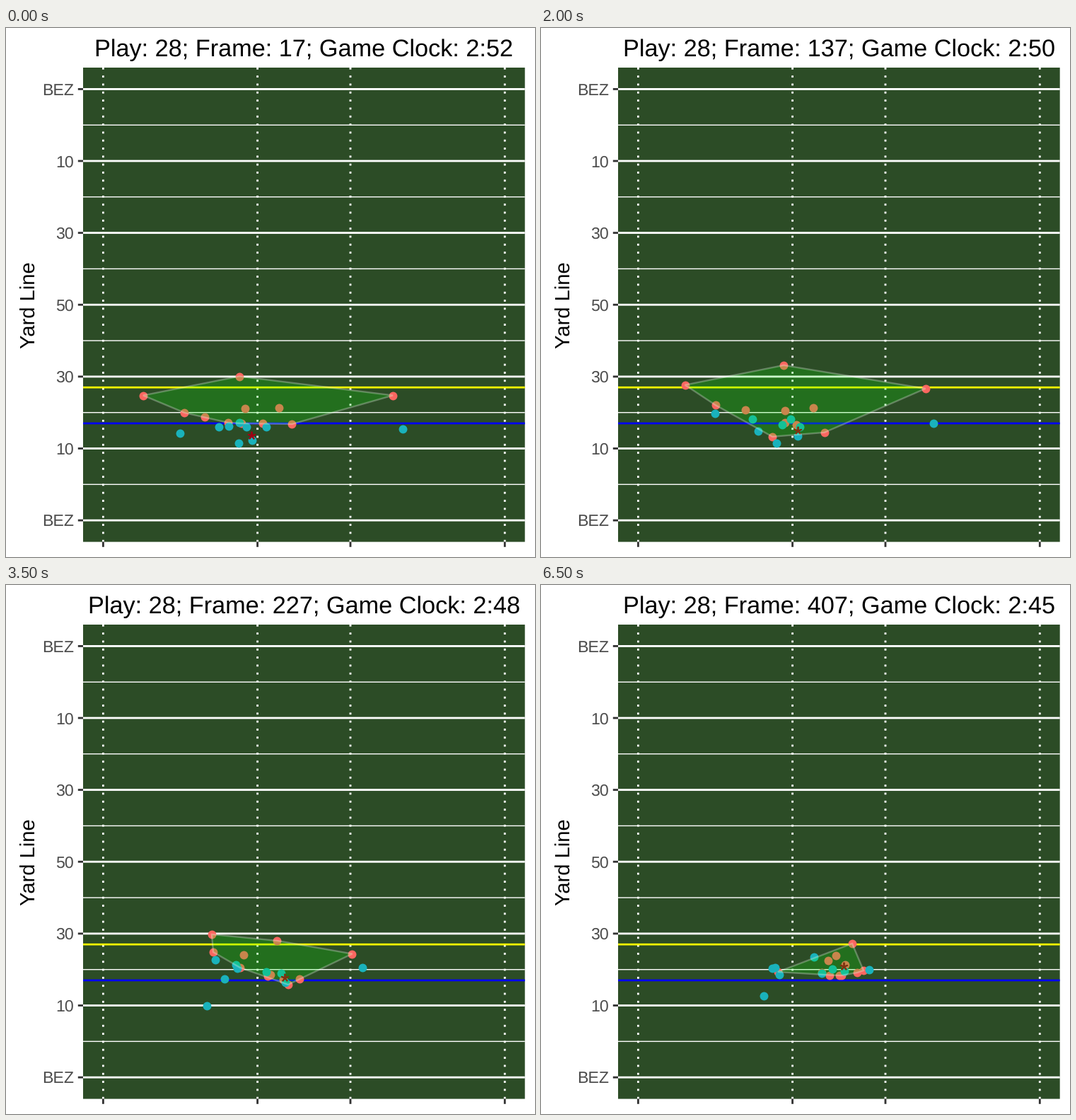
These frames come from a looping animation (748x748 px, 7000 ms). A matplotlib script:

```python
import numpy as np
import matplotlib.pyplot as plt
from matplotlib.animation import FuncAnimation
from matplotlib.patches import Polygon, Rectangle

SIZE, DPI = 748, 64
PX = 72 / DPI                      # points per pixel
STEPS, STEP_MS = 14, 500
LEFT, RIGHT, TOP, BOTTOM = 109, 733.7, 56, 726.6
GAP = 101.63                       # 20 yards
TURF, RED, TEAL = "#2c4c26", "#fa6760", "#1ab2bc"
MAJOR, MINOR = 2.83, 1.41

# line-up, snap, contact, end of play
PHASES = np.array([0, 3, 7, 13])

plt.rcParams["font.family"] = "Liberation Sans"
plt.rcParams["text.hinting"] = "none"
plt.rcParams["text.kerning_factor"] = 0


def run(*spots):
    """Path that rests until the snap, flows through contact, then coasts."""
    pts = np.array(spots, float)
    vel = np.gradient(pts, PHASES, axis=0)
    vel[:2] = 0
    vel[3] *= 0.3

    def at(step):
        i = min(np.searchsorted(PHASES, step, side="right") - 1, 2)
        span = PHASES[i + 1] - PHASES[i]
        u = (step - PHASES[i]) / span
        s = u * u * (3 - 2 * u)
        return ((1 - s) * pts[i] + s * pts[i + 1]
                + span * u * (1 - u) * ((1 - u) * vel[i] - u * vel[i + 1]))

    return at


secondary = [
    run((194, 519.5), (193, 506.5), (291, 494), (440, 507)),
    run((252.5, 544), (242, 535.5), (293, 519), (417.5, 524)),
    run((330, 492.5), (338, 473.5), (383.5, 503), (430, 537)),
    run((547, 519.5), (551, 508.5), (489.5, 521.5), (456, 545)),
]
linebackers = [
    run((281, 550), (283, 543), (336, 523), (406, 530.5)),
    run((338.5, 538), (347, 541.5), (331, 541), (335, 547)),
    run((386, 537), (386.5, 534.5), (374, 551), (397.5, 548)),
]
front = [
    run((314, 558), (317, 579.5), (399, 565), (425, 552)),
    run((333, 559), (342, 559), (370, 552.5), (408.5, 551.5)),
    run((363, 559), (357, 561), (392, 558), (422, 552)),
    run((404.5, 560), (399, 574), (415.5, 556.5), (447, 548)),
]
blockers = [
    run((301, 564), (295, 555), (325, 537), (327, 541.5)),
    run((315, 563), (307, 571.5), (309, 557), (337, 550.5)),
    run((330, 558), (343, 563.5), (327, 542), (331, 541)),
    run((340.5, 563.5), (351, 554), (368, 547), (397.5, 548.5)),
    run((368.5, 564), (362.5, 566), (389, 548.5), (412, 542.5)),
]
receivers = [
    run((246, 573), (239.5, 547.5), (296, 529.5), (386, 526)),
    run((561.5, 567), (562, 562), (504.5, 540.5), (464, 544)),
]
passer = run((329.5, 586.5), (340, 585.5), (284.5, 594.5), (315.5, 580.5))
carrier = run((348, 583), (359, 578.5), (395, 562), (429, 546))

defense = secondary + linebackers + front
offense = blockers + receivers + [passer, carrier]


def places(team, step):
    return np.array([player(step) for player in team])


def hull(points):
    pts = sorted(map(tuple, points))

    def chain(seq):
        out = []
        for p in seq:
            while len(out) > 1:
                a, b = out[-2:]
                if ((b[0] - a[0]) * (p[1] - a[1])
                        > (b[1] - a[1]) * (p[0] - a[0])):
                    break
                out.pop()
            out.append(p)
        return out[:-1]

    return chain(pts) + chain(pts[::-1])


fig = plt.figure(figsize=(SIZE / DPI, SIZE / DPI), dpi=DPI, facecolor="white")
ax = fig.add_axes([0, 0, 1, 1])
ax.set(xlim=(0, SIZE), ylim=(SIZE, 0))
ax.axis("off")


def line(xs, ys, color, width, z=2, **kw):
    ax.plot(xs, ys, color=color, lw=width * PX, zorder=z, snap=False,
            solid_capstyle="butt", **kw)


def across(y, color, width, z=2):
    line([LEFT, RIGHT], [y, y], color, width, z)


def label(x, y, text, size, **kw):
    return ax.text(x, y, text, fontsize=size * PX, va="baseline", **kw)


ax.add_patch(Rectangle((LEFT, TOP), RIGHT - LEFT, BOTTOM - TOP,
                       facecolor=TURF, lw=0, zorder=0, snap=False))

for i, name in enumerate(["BEZ", "10", "30", "50", "30", "10", "BEZ"]):
    y = 86.4 + GAP * i
    if i < 6:
        across(y + GAP / 2, "white", MINOR, 1)
    across(y, "white", MAJOR)
    line([LEFT - 7.2, LEFT], [y, y], "#333333", MAJOR)
    label(96.2, y + 8.3, name, 23.1, color="#4d4d4d", ha="right")

for x in (137.4, 355.6, 487, 705.3):
    line([x, x], [BOTTOM, TOP], "white", MAJOR, linestyle=(0, (1, 3)),
         dash_capstyle="butt")
    line([x, x], [BOTTOM, BOTTOM + 7.2], "#333333", MAJOR)

across(508.2, "yellow", 2.7, 3)
across(559, "blue", 2.7, 3)

label(40.5, 392, "Yard Line", 29.1, color="black", rotation=90,
      rotation_mode="anchor", ha="center")
title = label(421.2, 39.5, "", 34.2, color="black", ha="center")


def dots(color, z):
    return ax.plot([], [], "o", color=color, ms=11.9 * PX, mew=0,
                   zorder=z, snap=False)[0]


red_dots, teal_dots = dots(RED, 4), dots(TEAL, 5)
star, = ax.plot([], [], marker=(5, 2, 0), color="#a00014", ms=11.5 * PX,
                mew=1.9 * PX, ls="none", zorder=6, snap=False)
area = Polygon([(0, 0), (1, 0), (0, 1)], closed=True, lw=2.4 * PX,
               facecolor=(0, 1, 0, 0.2), edgecolor=(1, 1, 1, 0.28), zorder=7)
ax.add_patch(area)


def draw(step):
    reds = places(defense, step)
    red_dots.set_data(*reds.T)
    teal_dots.set_data(*places(offense, step).T)
    area.set_xy(hull(reds))
    x, y = carrier(step)
    star.set_data([x - 0.5], [y - 7.4])
    clock = 172 - (step + 1) // 2
    title.set_text(f"Play: 28; Frame: {17 + 30 * step}; "
                   f"Game Clock: {clock // 60}:{clock % 60:02d}")
    return red_dots, teal_dots, star, area, title


anim = FuncAnimation(fig, draw, frames=STEPS, interval=STEP_MS,
                     repeat=True, repeat_delay=0, blit=False)
plt.show()
```
